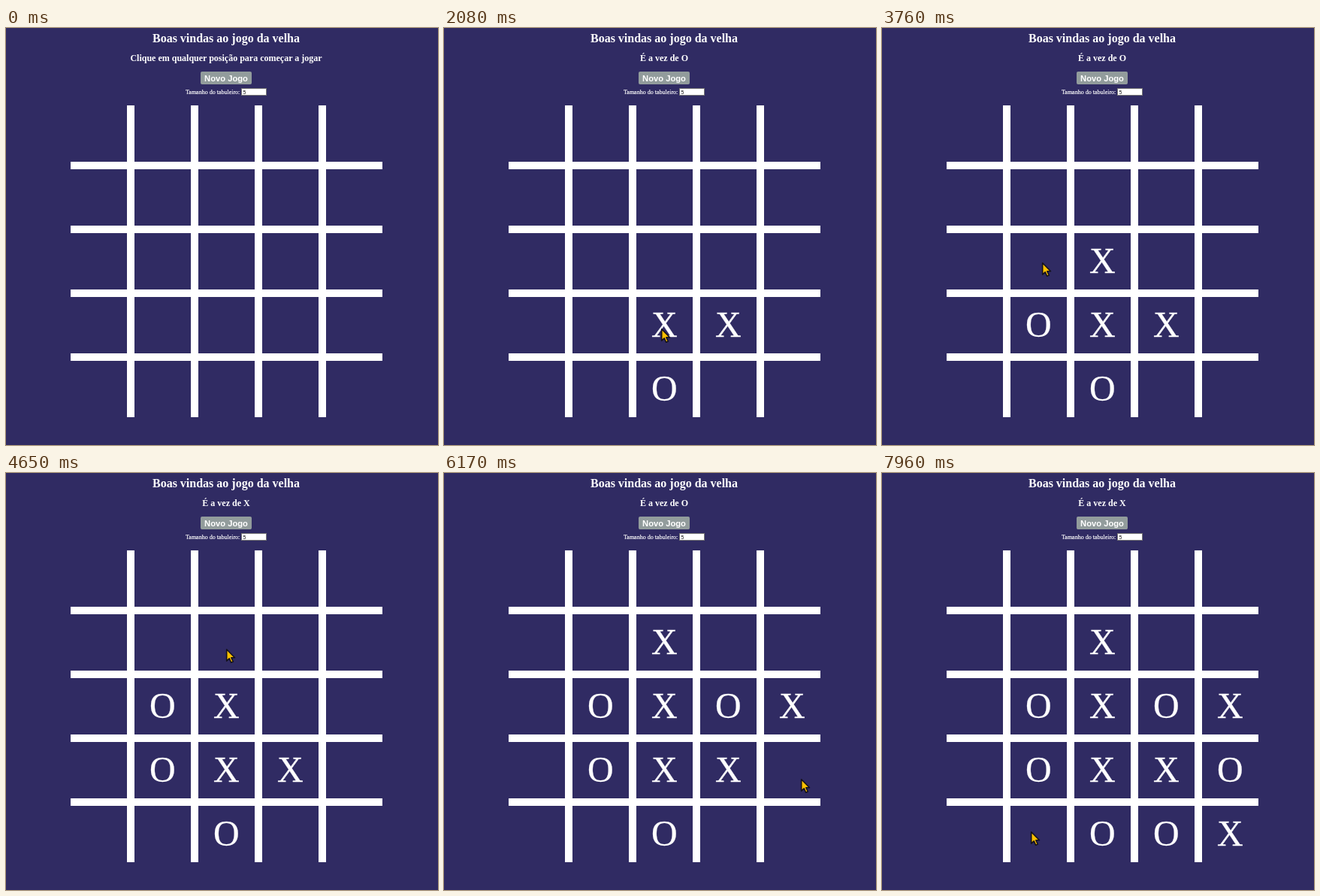
These frames come from a looping animation (575x555 px, 8 s). An HTML page:

```html
<!DOCTYPE html>
<html lang="pt-BR">
<head>
<meta charset="utf-8">
<title>Jogo da velha</title>
<style>
  html, body { margin: 0; width: 100%; height: 100%; overflow: hidden; background: #302b63; }
  svg { display: block; width: 575px; height: 555px; }
  text { fill: #fff; font-family: "Liberation Serif", "Times New Roman", serif; }
  .mid { text-anchor: middle; }
  .bold { font-weight: bold; }
  .sans { font-family: "Liberation Sans", Arial, sans-serif; }
  .label { font-size: 8px; stroke: #fff; stroke-width: .2px; }
  .mark { font-size: 48px; text-anchor: middle; stroke: #fff; stroke-width: .3px; visibility: hidden; }
</style>
</head>
<body>
<svg viewBox="0 0 575 555">
  <text class="mid bold" x="293" y="19" font-size="16">Boas vindas ao jogo da velha</text>
  <text class="mid bold" id="status" x="293" y="44" font-size="12"></text>
  <rect x="259" y="58" width="68" height="17" rx="2" fill="#929c9c"/>
  <text class="mid bold sans" x="293" y="71" font-size="11.2">Novo Jogo</text>
  <text class="label" x="239" y="88">Tamanho do tabuleiro:</text>
  <rect x="313.5" y="80.5" width="33" height="9" fill="#fff" stroke="#767676"/>
  <text class="sans" x="315.5" y="88" font-size="7" style="fill:#111">5</text>
  <path id="grid" stroke="#fff" stroke-width="10"/>
  <g id="marks"></g>
  <path id="cursor" d="M.7 .8V16.2L4.2 12.9L6.6 18.2L9.3 17L6.9 11.8H11.5Z" fill="#ffc000" stroke="#15131c" stroke-width="1.6" stroke-linejoin="round"/>
</svg>
<script>
  const LOOP = 8000, SIZE = 5, CELL = 85, LEFT = 81, TOP = 98;
  const START = "Clique em qualquer posição para começar a jogar";

  // Pointer stops: time, x, y and the mark left by a click
  const stops = [
    [250, 503, 534], [760, 378, 405, "X"], [1440, 301, 480, "O"],
    [2080, 289, 400, "X"], [2540, 190, 403, "O"], [3280, 264, 323, "X"],
    [3900, 205, 310, "O"], [4300, 205, 310], [4760, 308, 221, "X"],
    [5240, 368, 315, "O"], [5680, 473, 322, "X"], [6340, 475, 423, "O"],
    [7000, 462, 487, "X"], [7420, 372, 491, "O"], [7960, 198, 477]
  ];
  const clicks = stops.filter(s => s[3]);

  const $ = id => document.getElementById(id);
  const status = $("status"), cursor = $("cursor");
  const ease = k => k * k * (3 - 2 * k);
  const cellCentre = (v, start) => start + (Math.floor((v - start) / CELL) + .5) * CELL;

  let lines = "";
  for (let i = 1; i < SIZE; i++) {
    const d = i * CELL, span = SIZE * CELL - 10;
    lines += `M${LEFT + d} ${TOP + 5}v${span}M${LEFT + 5} ${TOP + d}h${span}`;
  }
  $("grid").setAttribute("d", lines);

  const marks = clicks.map(([, x, y, mark]) => {
    const el = document.createElementNS("http://www.w3.org/2000/svg", "text");
    el.setAttribute("class", "mark");
    el.setAttribute("x", cellCentre(x, LEFT) - .17);
    el.setAttribute("y", cellCentre(y, TOP) + 15.5);
    el.textContent = mark;
    $("marks").append(el);
    return el;
  });

  function tipAt(t) {
    const i = stops.findIndex(s => s[0] > t);
    if (i < 0) return stops[stops.length - 1].slice(1);
    const [t0, x0, y0] = stops[i - 1], [t1, x1, y1] = stops[i];
    const k = ease((t - t0) / (t1 - t0));
    return [x0 + (x1 - x0) * k, y0 + (y1 - y0) * k];
  }

  function draw() {
    const t = performance.now() % LOOP;
    const count = clicks.filter(c => c[0] <= t).length;
    marks.forEach((el, i) => el.style.visibility = i < count ? "visible" : "hidden");
    status.textContent = count ? "É a vez de " + (count % 2 ? "O" : "X") : START;

    const inside = t >= stops[0][0];
    cursor.style.visibility = inside ? "visible" : "hidden";
    if (inside) {
      const [x, y] = tipAt(t).map(Math.round);
      cursor.setAttribute("transform", `translate(${x} ${y})`);
    }
    requestAnimationFrame(draw);
  }
  draw();
</script>
</body>
</html>
```
